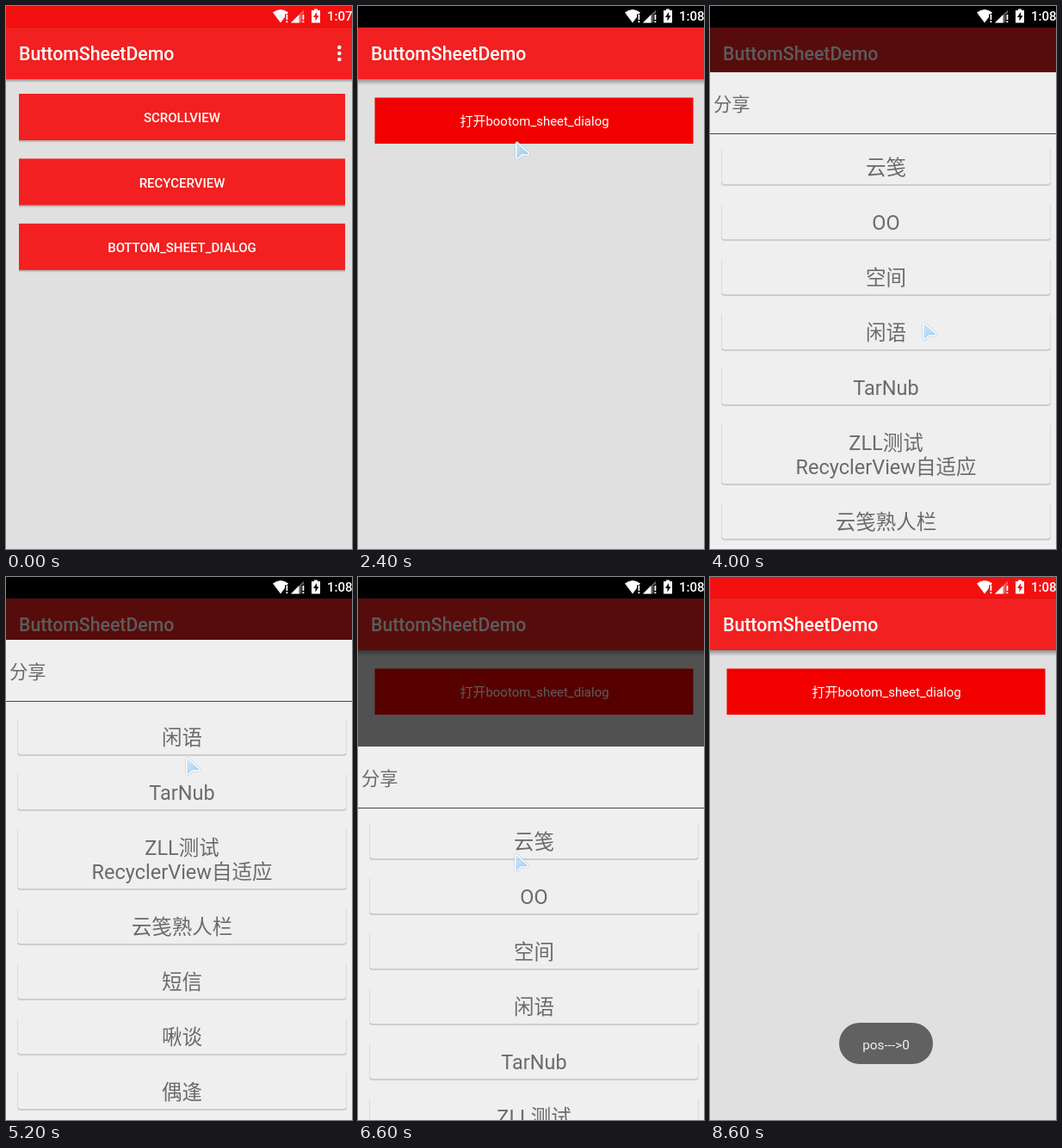
Recreate the animation shown at these times as an HTML page. Size 402 px wide and 631 px high, loop 9000 ms.

```html
<!DOCTYPE html>
<html lang="zh-CN">
<head>
<meta charset="utf-8">
<title>Bottom sheet demo</title>
<style>
html, body { margin: 0; width: 100%; height: 100%; overflow: hidden; background: #e0e0e0; }
svg { display: block; width: 402px; height: 631px; }
text { font-family: Roboto, "Noto Sans CJK SC", "Noto Sans CJK", sans-serif; fill: #fff; }
.mid { text-anchor: middle; }
.title { font-size: 21.3px; font-weight: 500; }
.btn, .clock { font-size: 15px; font-weight: 500; }
.open { font-size: 15px; }
.head { font-size: 21.3px; fill: #6b6b6b; }
.item { font-size: 23.5px; fill: #6b6b6b; }
.toast { font-size: 15.3px; fill: #f2f2f2; }
.side { fill: none; stroke: #dcdcdc; }
.base { fill: none; stroke: #cdcdcd; stroke-width: 2; }
</style>
</head>
<body>
<svg viewBox="0 0 402 631">
  <defs>
    <linearGradient id="shade" x2="0" y2="1">
      <stop offset="0" stop-color="#000" stop-opacity=".36"/>
      <stop offset="1" stop-color="#000" stop-opacity="0"/>
    </linearGradient>
    <linearGradient id="glass" x2="1" y2="1">
      <stop offset="0" stop-color="#c4e6fd"/>
      <stop offset="1" stop-color="#76b8f2"/>
    </linearGradient>
    <clipPath id="listClip"><rect y="72" width="402" height="631"/></clipPath>
    <path id="arrow" d="M3.5 2Q1.8 .8 1.8 3V19Q2 21.7 4.3 20L8.5 16H14.8Q18 15.5 15.5 13Z"/>
  </defs>

  <g id="menu"></g>
  <g id="page"></g>
  <rect id="dim" y="25" width="402" height="606"/>

  <rect width="402" height="24" fill="#f31010"/>
  <rect y="24" width="402" height="1" fill="#d91212"/>
  <rect id="black" width="402" height="25"/>
  <g fill="#fff">
    <path d="M310 7.5Q319 .5 328 7.5L326.5 9.5H324V13L319 19.5Z"/>
    <path d="M325.5 10h1.8v6h-1.8zM325.5 17.3h1.8v1.9h-1.8z"/>
    <path d="M331 19.5L346 4.5V9H343.5V19.5Z" opacity=".35"/>
    <path d="M331 19.5L340.5 10V19.5Z"/>
    <path d="M344.5 10h1.8v6h-1.8zM344.5 17.3h1.8v1.9h-1.8z"/>
    <path fill-rule="evenodd" d="M355 5H358V3.5H362V5H365V19.5H355ZM361 7L357 13H359.5V17.5L363.5 11.3H361Z"/>
  </g>
  <text id="clock" class="clock" x="373" y="17">1:07</text>

  <g id="sheet">
    <rect width="402" height="631" fill="#efefef"/>
    <text class="head" x="4" y="45">分享</text>
    <rect y="71" width="402" height="1" fill="#444"/>
    <g clip-path="url(#listClip)"><g id="list"></g></g>
  </g>

  <g id="toast">
    <rect x="150" y="518" width="109" height="48" rx="24" fill="#616161"/>
    <text class="toast mid" x="204.5" y="548.5">pos---&gt;0</text>
  </g>

  <g id="cursor">
    <use href="#arrow" fill="none" stroke="#7fb6ec" stroke-width="3" stroke-opacity=".45"/>
    <use href="#arrow" fill="url(#glass)" fill-opacity=".65" stroke="#fff" stroke-width="1.5"/>
  </g>
</svg>

<script>
const STEP = 200, STEPS = 45;
const HIDDEN = 640, PEEK = 359, FULL = 73, MAX_SCROLL = 189;
const $ = id => document.getElementById(id);

const rect = (x, y, w, h, fill, more = '') =>
  `<rect x="${x}" y="${y}" width="${w}" height="${h}" fill="${fill}" ${more}/>`;
const label = (cls, x, y, str) => `<text class="${cls}" x="${x}" y="${y}">${str}</text>`;

const screen = depth => rect(0, 25, 402, 606, '#e0e0e0') +
  rect(0, 85, 402, depth, 'url(#shade)') + rect(0, 25, 402, 60, '#f22020') +
  label('title', 15, 63, 'ButtomSheetDemo');

const menuButton = (name, i) => {
  const y = 102 + i * 75.4;
  return rect(15, y + 53, 379, 4, 'url(#shade)') + rect(15, y, 379, 54, '#f22020') +
    label('btn mid', 204.5, y + 33.2, name);
};

$('menu').innerHTML = screen(4) +
  [48, 55, 62].map(y => `<circle cx="387.3" cy="${y}" r="2.3" fill="#fff"/>`).join('') +
  ['SCROLLVIEW', 'RECYCERVIEW', 'BOTTOM_SHEET_DIALOG'].map(menuButton).join('') +
  rect(15, 252.8, 379, 54, '#fff', 'id="press"');
$('page').innerHTML = screen(7) + rect(19.5, 106.5, 370, 53.5, '#f20000') +
  label('open mid', 205, 139, '打开bootom_sheet_dialog');

// A row with two lines is taller.
const rows = [['云笺'], ['OO'], ['空间'], ['闲语'], ['TarNub'], ['ZLL测试', 'RecyclerView自适应'],
  ['云笺熟人栏'], ['短信'], ['啾谈'], ['偶逢']];
let rowY = 89;
$('list').innerHTML = rows.map(lines => {
  const y = rowY, b = y + 15 + lines.length * 28;
  rowY = b + 21;
  return `<path class="side" d="M13.5 ${y}V${b - 2}M395.5 ${y}V${b - 2}"/>` +
    `<path class="base" d="M14 ${b - 3}q.5 2 3 2H392q2.5 0 3 -2"/>` +
    lines.map((s, i) => label('item mid', 204.5, y + 29.5 + i * 28, s)).join('');
}).join('');

// Eased path through key points [step, ...values].
const through = keys => k => {
  const i = keys.findIndex(key => key[0] > k);
  if (i < 1) return keys.at(i).slice(1);
  const [a, b] = [keys[i - 1], keys[i]];
  const p = (k - a[0]) / (b[0] - a[0]), e = p * p * (3 - 2 * p);
  return a.slice(1).map((v, n) => v + (b[n + 1] - v) * e);
};

const sheetY = through([[12, HIDDEN], [14, PEEK], [17, PEEK], [20, 77], [21, FULL], [31, FULL],
  [33, 197], [35, PEEK], [40, PEEK], [42, HIDDEN]]);
const scrollY = through([[21, 0], [25, MAX_SCROLL], [26, MAX_SCROLL], [30, 0]]);
const pointer = through([[2, 224, 287], [4, 226, 323], [6, 226, 323], [7, 226, 345],
  [12, 182, 157], [14, 193, 197], [17, 240, 520], [20, 246, 367], [22, 235, 500],
  [26, 208, 209], [28, 206, 390], [31, 186, 205], [33, 181, 321], [36, 242, 561], [38, 195, 471]]);

const move = (id, x, y) => $(id).setAttribute('transform', `translate(${x} ${y})`);
const show = (id, amount) => $(id).setAttribute('opacity', +amount);

function draw(now) {
  const k = Math.floor(now / STEP) % STEPS;
  const [y] = sheetY(k);
  show('menu', k < 4);
  show('press', k === 3 ? .2 : 0);
  show('page', k >= 4);
  show('dim', .64 * Math.min(1, (HIDDEN - y) / (HIDDEN - PEEK)));
  show('black', k >= 12 && k < 42);
  show('toast', Math.min(1, Math.max(0, (k - 41) / 2)));
  show('cursor', k >= 1 && k < 43);
  $('clock').textContent = k < 10 ? '1:07' : '1:08';
  move('sheet', 0, y);
  move('list', 0, -scrollY(k)[0]);
  move('cursor', ...pointer(k));
}

const start = performance.now();
function tick() {
  draw(performance.now() - start);
  requestAnimationFrame(tick);
}
tick();
</script>
</body>
</html>
```
